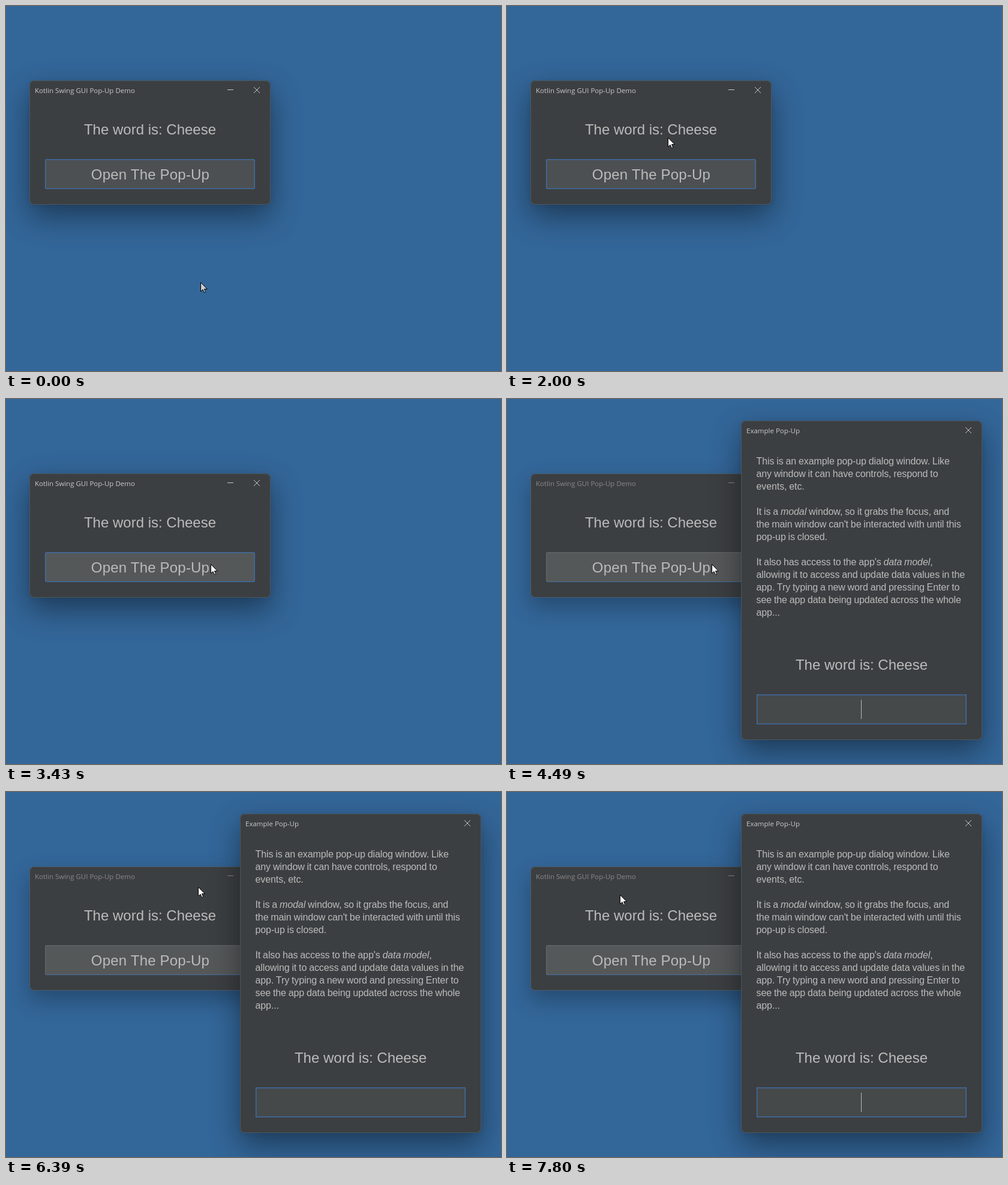
Write an HTML page that moves like this. It is 825x608 px and loops after 8000 ms.

```html
<!DOCTYPE html>
<html lang="en">
<head>
<meta charset="utf-8">
<title>Pop-up demo</title>
<style>
  html, body { margin: 0; width: 825px; height: 608px; overflow: hidden; background: #336699; }
  .win {
    position: absolute; border-radius: 8px; background: #3c3f41;
    box-shadow: inset 0 0 0 1px #4c565e, 0 20px 50px rgba(0,0,0,.42), 0 2px 8px rgba(0,0,0,.06);
  }
  .win.idle { box-shadow: inset 0 0 0 1px #4a5e72, 0 16px 36px rgba(0,0,0,.27); }
  #main { left: 39px; top: 124px; width: 402px; height: 207px; }
  #popup { left: 390px; top: 36px; width: 402px; height: 532px; }
  svg { position: absolute; left: 0; top: 0; width: 100%; height: 100%; }
  text { fill: #bbb; font-family: "Liberation Sans", Arial, sans-serif; white-space: pre; }
  .title { font: 11.5px "Open Sans", "Noto Sans", sans-serif; fill: #c8c8c8; }
  .big { font-size: 24px; text-anchor: middle; }
  #body { font-size: 16px; letter-spacing: -.1px; word-spacing: -.45px; }
  #body i { font-style: italic; }
  .icon { stroke: #c8c8c8; fill: none; }
  .box { stroke: #3f6ca3; stroke-width: 1.5; }
  .idle .title { fill: #8b8888; }
  .idle .icon { stroke: #8b8888; }
  .idle #button { stroke: #5f6365; }
  #edge { stroke: #3f6ca3; display: none; }
  .idle #edge { display: inline; }
  #cursor { width: 14px; height: 20px; }
</style>
</head>
<body>
<div id="main" class="win">
  <svg viewBox="39 124 402 207">
    <text class="title" x="48" y="145">Kotlin Swing GUI Pop-Up Demo</text>
    <path class="icon" d="M369 139.5h10M413 135l10 10m0-10l-10 10"/>
    <text class="big" x="240" y="214">The word is: Cheese</text>
    <rect id="button" class="box" x="65.75" y="255.75" width="348.5" height="48.5" rx="2"/>
    <path id="edge" d="M67 304.5h346"/>
    <text class="big" x="240.5" y="289" letter-spacing=".2">Open The Pop-Up</text>
  </svg>
</div>
<div id="popup" class="win">
  <svg viewBox="390 36 402 532">
    <text class="title" x="399" y="57">Example Pop-Up</text>
    <path class="icon" d="M764 47l10 10m0-10l-10 10"/>
    <g id="body"></g>
    <text class="big" x="591" y="451">The word is: Cheese</text>
    <rect class="box" x="416.75" y="492.75" width="348.5" height="48.5" fill="#45494a"/>
    <path id="caret" d="M590.5 501v32" stroke="#bbb"/>
  </svg>
</div>
<svg id="cursor" viewBox="0 0 14 20">
  <path id="arrow" d="M.5.5V15.5L4 12.3L6.4 17.5L8.6 16.6L6.5 11.5H11.3Z" stroke="#000"/>
</svg>
<script>
const LOOP = 8000, OPEN = 4490, BRIGHT = 790, BLINK = 530, STEP = 65;

const HELP = `This is an example pop-up dialog window. Like
any window it can have controls, respond to
events, etc.

It is a *modal* window, so it grabs the focus, and
the main window can't be interacted with until this
pop-up is closed.

It also has access to the app's *data model*,
allowing it to access and update data values in the
app. Try typing a new word and pressing Enter to
see the app data being updated across the whole
app...`;

// Pointer strokes: each goes on from the last one, bent towards "via"
const START = [324, 460];
const MOVES = [
  { from: 120, until: 260, to: [338, 396] },
  { from: 1060, until: 1800, to: [300, 205], via: [370, 270] },
  { from: 1870, until: 2000, to: [268, 219] },
  { from: 2070, until: 2620, to: [352, 232], via: [380, 230] },
  { from: 2690, until: 2970, to: [297, 240] },
  { from: 3200, until: 3430, to: [341, 275], via: [385, 240] },
  { from: 5020, until: 5300, to: [526, 139] },
  { from: 5560, until: 5700, to: [552, 31] },
  { from: 6030, until: 6390, to: [320, 158] },
  { from: 6590, until: 6730, to: [288, 162] },
  { from: 7130, until: 7800, to: [188, 171] }
];

const $ = id => document.getElementById(id);

$('body').innerHTML = HELP.split('\n').map((line, i) =>
  `<text x="415.5" y="${109 + 21 * i}">${line.replace(/\*(.+?)\*/, '<tspan font-style="italic">$1</tspan>')}</text>`
).join('');

// The pointer is sampled in steps, the first one at the start of a stroke
function pointer(t) {
  const steps = ms => Math.floor(ms / STEP) + 1;
  let pos = START;
  for (const { from, until, to, via } of MOVES) {
    if (t < from) break;
    const u = Math.min(1, steps(t - from) / steps(until - from));
    pos = pos.map((p, c) => {
      const bend = via ? via[c] : (p + to[c]) / 2;
      return Math.round((1 - u) ** 2 * p + 2 * u * (1 - u) * bend + u * u * to[c]);
    });
  }
  return pos;
}

function draw(t) {
  const open = t >= OPEN, [x, y] = pointer(t);
  const hover = open || (x >= 65 && x < 415 && y >= 255 && y < 305);
  $('cursor').style.transform = `translate(${x}px, ${y}px)`;
  $('arrow').setAttribute('fill', t < BRIGHT ? '#ccc' : '#fff');
  $('button').setAttribute('fill', hover ? '#555859' : '#4c5052');
  $('main').classList.toggle('idle', open);
  $('popup').style.display = open ? 'block' : 'none';
  $('caret').style.display = Math.floor((t - OPEN) / BLINK) % 2 ? 'none' : 'inline';
}

const begin = performance.now();
function tick() {
  draw((performance.now() - begin) % LOOP);
  requestAnimationFrame(tick);
}
tick();
</script>
</body>
</html>
```
